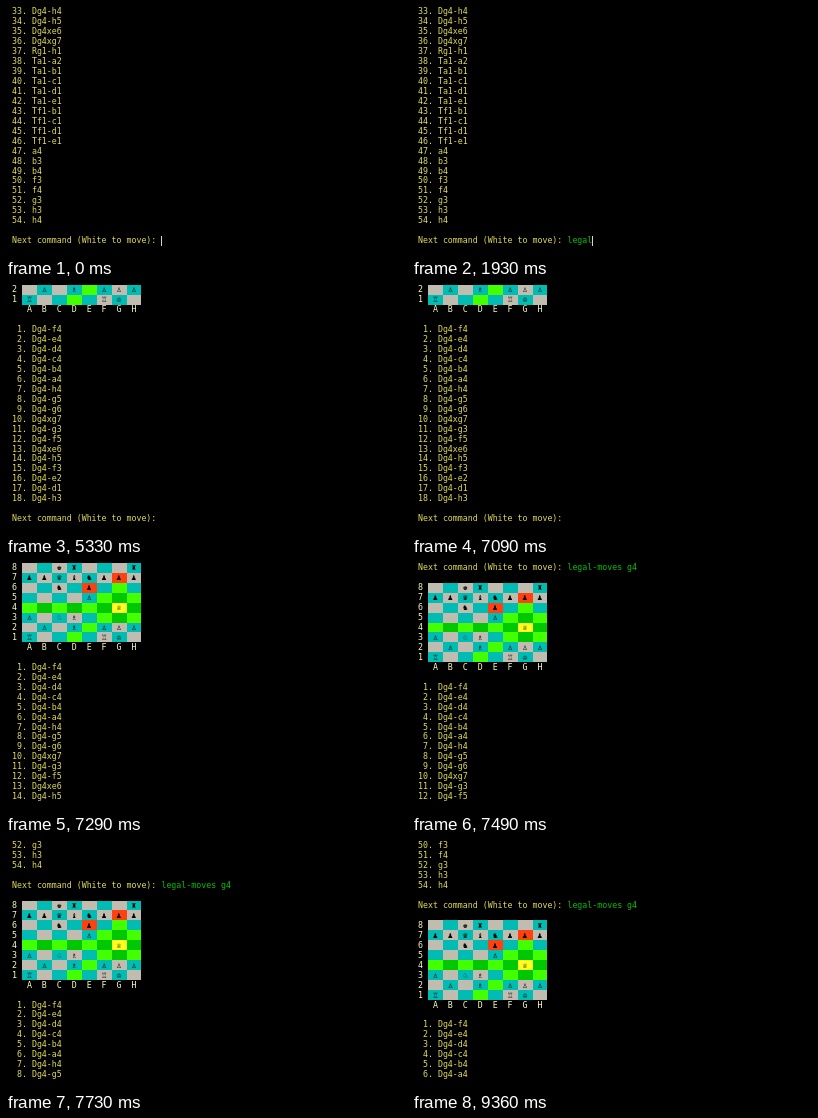
Recreate the animation shown at these times as an HTML page with a canvas. Size 400x250 px, loop 9760 ms.

```html
<!DOCTYPE html>
<html lang="en">
<head>
<meta charset="utf-8">
<style>
  html, body { margin: 0; width: 100%; height: 100%; overflow: hidden; background: #000; }
  canvas { display: block; }
</style>
</head>
<body>
<canvas id="screen" width="400" height="250"></canvas>
<script>
const ctx = document.getElementById('screen').getContext('2d');

const LOOP = 9760, ENTER = 5330, READY = 5357, BLINK = 533;
const ROWS = 24, COL = 4.98, ROW = 9.97, LEFT = 6, TOP = 0.7;
const YELLOW = '#e2dc58', LABEL = '#fcfac0', GREEN = '#00c400';
const FONT = '8.27px "DejaVu Sans Mono", monospace';

const PROMPT = 'Next command (White to move): ';
const COMMAND = 'legal-moves g4';
const KEY_TIMES = [830, 1000, 1200, 1570, 1930, 3200, 3370, 3530, 3700, 3900, 4130, 4900, 4930, 5170];
// [time, lines scrolled back]
const WHEEL = [[7190, 2], [7250, 4], [7290, 6], [7430, 8], [7560, 10], [7660, 12], [7860, 14]];

const POSITION = '2kr3r/ppqbnppp/2n1p3/4P3/6Q1/P1NB4/1P1B1PPP/R4RK1';
const GLYPHS = Object.fromEntries([...'KQRBNPkqrbnp'].map((p, i) => [p, String.fromCharCode(0x2654 + i) + '\uFE0E']));

const allMoves = ('Dg4-h4 Dg4-h5 Dg4xe6 Dg4xg7 Rg1-h1 Ta1-a2 Ta1-b1 Ta1-c1 Ta1-d1 Ta1-e1 ' +
  'Tf1-b1 Tf1-c1 Tf1-d1 Tf1-e1 a4 b3 b4 f3 f4 g3 h3 h4').split(' ');
const queenMoves = '-f4 -e4 -d4 -c4 -b4 -a4 -h4 -g5 -g6 xg7 -g3 -f5 xe6 -h5 -f3 -e2 -d1 -h3'
  .split(' ').map(m => 'Dg4' + m);

const colX = col => LEFT + col * COL;
const rowY = row => TOP + row * ROW;

function text(str, col, row, color) {
  ctx.font = FONT;
  ctx.fillStyle = color;
  ctx.fillText(str, colX(col), Math.round(rowY(row) + 7.3));
}

// Fills whole character cells, snapped to pixels.
function fillCells(col, row, count, color) {
  const x = Math.round(colX(col)), y = Math.round(rowY(row));
  ctx.fillStyle = color;
  ctx.fillRect(x, y, Math.round(colX(col + count)) - x, Math.round(rowY(row + 1)) - y);
}

function squareColor(square, light) {
  if (square === 'g4') return '#ffff20';
  const move = queenMoves.find(m => m.endsWith(square));
  if (!move) return light ? '#c0bdb0' : '#00bcb2';
  if (move.includes('x')) return '#ff4010';
  return light ? '#44ff00' : '#00c800';
}

function boardRow(pieces, r) {
  const rank = 8 - r;
  const squares = [...pieces.replace(/\d/g, n => ' '.repeat(n))];
  return row => {
    text(rank, 0, row, LABEL);
    squares.forEach((piece, file) => {
      const col = 2 + file * 3;
      fillCells(col, row, 3, squareColor('abcdefgh'[file] + rank, (file + r) % 2 === 0));
      if (piece !== ' ') text(GLYPHS[piece], col + 1, row, '#000');
    });
  };
}

const listing = (moves, first) =>
  moves.map((m, i) => row => text(`${String(first + i).padStart(2)}. ${m}`, 0, row, YELLOW));
const blank = () => {};

function promptLine(typed) {
  return row => {
    text(PROMPT, 0, row, YELLOW);
    text(typed, PROMPT.length, row, GREEN);
  };
}

const before = [...listing(allMoves, 33), blank];
const after = [
  ...before, promptLine(COMMAND), blank,
  ...POSITION.split('/').map(boardRow),
  row => text('A  B  C  D  E  F  G  H', 3, row, LABEL),
  blank, ...listing(queenMoves, 1), blank, promptLine('')
];

function render(t) {
  const entered = t >= ENTER;
  const typed = entered ? 0 : KEY_TIMES.filter(k => k <= t).length;
  const scrolled = WHEEL.reduce((lines, [time, n]) => t >= time ? n : lines, 0);
  const lines = entered ? after : [...before, promptLine(COMMAND.slice(0, typed))];
  const top = lines.length - ROWS - scrolled;

  ctx.fillStyle = '#000';
  ctx.fillRect(0, 0, 400, 250);
  lines.slice(top, top + ROWS).forEach((draw, row) => draw(row));

  // The blink restarts on every key press.
  const lastInput = entered ? READY : typed ? KEY_TIMES[typed - 1] : -466;
  const visible = t >= lastInput && Math.floor((t - lastInput) / BLINK) % 2 === 0;
  if (visible && !scrolled) {
    ctx.fillStyle = '#d4d4c8';
    ctx.fillRect(Math.floor(colX(PROMPT.length + typed)), Math.round(rowY(ROWS - 1)), 1, 10);
  }
}

const start = performance.now();
function tick() {
  render((performance.now() - start) % LOOP);
  requestAnimationFrame(tick);
}
tick();
</script>
</body>
</html>
```
